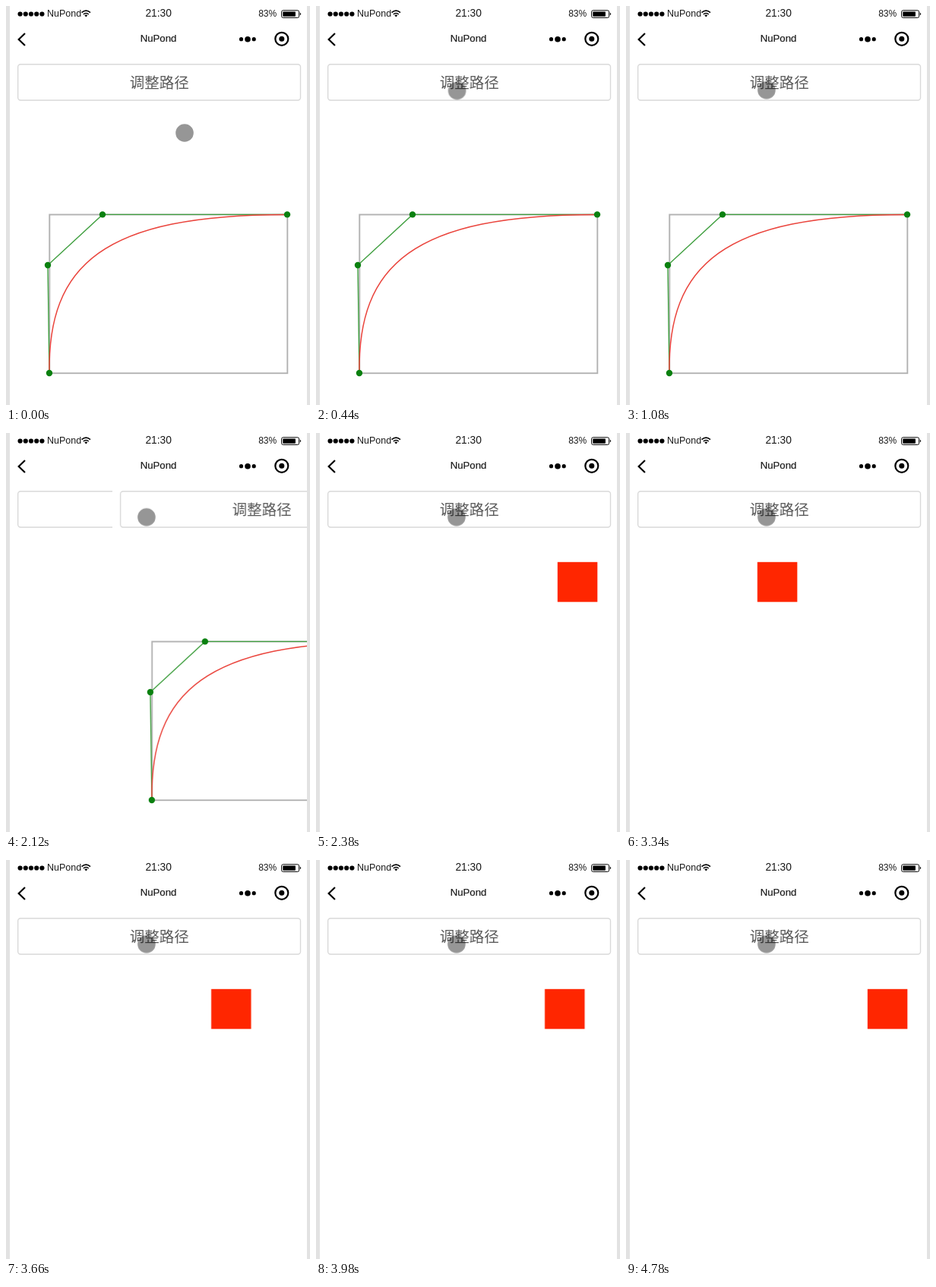
Write an HTML page that moves like this. It is 400x525 px and loops after 5620 ms.

```html
<!DOCTYPE html>
<html lang="zh-CN">
<head>
<meta charset="utf-8">
<title>调整路径</title>
<style>
  html, body { margin: 0; width: 100%; height: 100%; overflow: hidden; background: #e2e2e2; }
  svg { display: block; width: 400px; height: 525px; }
  text { font-family: "Liberation Sans", Arial, sans-serif; fill: #1a1a1a; }
  .label { font: 300 19.5px "Noto Sans CJK SC", "Noto Sans CJK", sans-serif; fill: #5a5a5a; text-anchor: middle; }
  .line { fill: none; }
</style>
</head>
<body>
<svg viewBox="0 0 400 525">
  <defs>
    <clipPath id="screen"><rect x="5" y="0" width="391" height="525"/></clipPath>
    <g id="button">
      <rect x="15.7" y="76.7" width="371.8" height="47.3" rx="3.5" fill="#fff" stroke="#d9d9d9" stroke-width="1.4"/>
      <text class="label" x="201.8" y="108">调整路径</text>
    </g>
  </defs>

  <g clip-path="url(#screen)">
    <rect x="5" width="391" height="525" fill="#fff"/>

    <!-- square page -->
    <use href="#button"/>
    <rect id="square" x="317.8" y="169.8" width="52.5" height="52.5" fill="#ff2600"/>

    <!-- curve editor page -->
    <g id="editor">
      <rect x="5" y="64" width="391" height="461" fill="#fff"/>
      <use href="#button"/>
      <rect class="line" x="57.3" y="274.5" width="313" height="208.7" stroke="#b2b2b2" stroke-width="1.9"/>
      <path class="line" d="M57 483L55 341L127 274.4H370" stroke="#3f9f3f" stroke-width="1.4"/>
      <path class="line" d="M57 483C55 341 127 274.4 370 274.4" stroke="#ea443c" stroke-width="1.5"/>
      <g fill="#0a800f">
        <circle cx="57" cy="483" r="4.2"/>
        <circle cx="55" cy="341" r="4.2"/>
        <circle cx="127" cy="274.4" r="4.2"/>
        <circle cx="370" cy="274.4" r="4.2"/>
      </g>
    </g>

    <!-- status bar -->
    <g>
      <circle cx="18.6" cy="10.5" r="3.1"/>
      <circle cx="25.8" cy="10.5" r="3.1"/>
      <circle cx="33" cy="10.5" r="3.1"/>
      <circle cx="40.2" cy="10.5" r="3.1"/>
      <circle cx="47.4" cy="10.5" r="3.1"/>
    </g>
    <text x="54" y="14.3" font-size="12.5">NuPond</text>
    <g class="line" stroke="#000" stroke-width="1.6">
      <path d="M99.6 8.6Q105.3 3.8 111 8.6M101.8 11Q105.3 8 108.8 11"/>
      <path d="M105.3 14.4L103.3 12.2Q105.3 10.8 107.3 12.2Z" fill="#000" stroke="none"/>
    </g>
    <text x="200.7" y="14.3" font-size="13.8" text-anchor="middle">21:30</text>
    <text x="332.2" y="14.2" font-size="12">83%</text>
    <rect class="line" x="362.6" y="5.8" width="23" height="9.6" rx="2" stroke="#000"/>
    <rect x="364.3" y="7.5" width="16.6" height="6.2" rx=".6"/>
    <path d="M386.8 8.6Q389.6 10.6 386.8 12.6Z"/>

    <!-- navigation bar -->
    <path class="line" d="M25 36L16.7 44L25 52" stroke="#000" stroke-width="2.2"/>
    <text x="200.5" y="47.3" font-size="13.2" text-anchor="middle" stroke="#1a1a1a" stroke-width=".2">NuPond</text>
    <circle cx="309.5" cy="43.7" r="2.6"/>
    <circle cx="318" cy="43.7" r="3.8"/>
    <circle cx="326.2" cy="43.7" r="2.6"/>
    <circle class="line" cx="362.8" cy="43.3" r="8.5" stroke="#000" stroke-width="2.2"/>
    <circle cx="362.8" cy="43.3" r="3.5"/>

    <circle id="touch" r="11.8" fill="#000" fill-opacity=".41"/>
  </g>
</svg>

<script>
  const LOOP = 5620;
  const CURVE = 'cubic-bezier(0, .68, .224, 1)';

  // steps: [time in ms, x, y, easing towards the next step]
  function move(id, steps) {
    const frames = steps.map(([time, x, y, easing = 'linear']) => ({
      offset: time / LOOP,
      transform: `translate(${x}px, ${y}px)`,
      easing
    }));
    document.getElementById(id).animate(frames, { duration: LOOP, iterations: Infinity });
  }

  move('touch', [
    [0, 235, 167],
    [20, 235, 167, 'ease-in-out'],
    [480, 184.9, 110.7],
    [LOOP, 184.9, 110.7]
  ]);

  move('editor', [
    [0, 0, 0],
    [2070, 0, 0, 'ease'],
    [2300, 391, 0],
    [LOOP, 391, 0]
  ]);

  move('square', [
    [0, 0, 0],
    [3080, 0, 0, CURVE],
    [3260, -261, 0],
    [3274.5, -261, 0, CURVE],
    [4674.5, 0, 0],
    [LOOP, 0, 0]
  ]);
</script>
</body>
</html>
```
